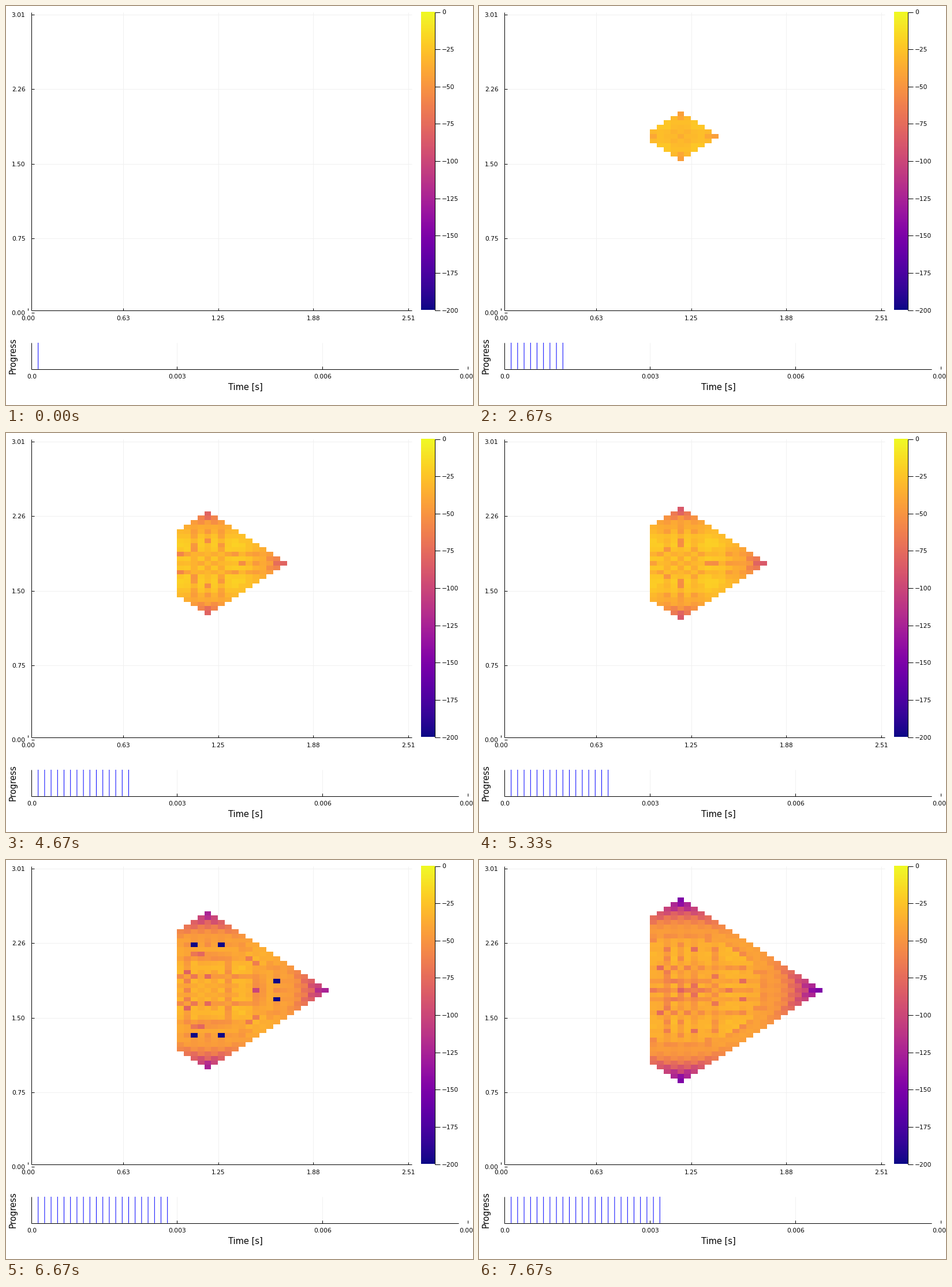
A matplotlib script that plays this animation: 809x692 px, repeating every 8000 ms.

```python
import numpy as np
import matplotlib.pyplot as plt
from matplotlib.animation import FuncAnimation

W, H, DPI = 809, 692, 64
PX = 72 / DPI                      # one pixel in points
FRAMES, LOOP_MS = 24, 8000

NX, NY = 55, 66                    # cells of the visible slice
X0, DX = 38.5, 11.975              # pixel position of cell index 0 and cell pitch
Y0, DY = 532.0, 7.842
EMIT_X, EMIT_Y, WALL_X = 26, 39, 21  # emitter cell and absorbing wall plane
SLICE_DIST = 4                     # planes between the emitter and the slice
REFLECTION = 0.4


def simulate():
    """3D leapfrog wave scheme at the stability limit; dB levels per frame."""
    depth = 2 * FRAMES + 1
    mid = depth // 2
    shape = (NX + 1 - WALL_X, NY + 1, depth)
    prev, cur = np.zeros(shape), np.zeros(shape)
    loss = (1 - REFLECTION) / (1 + REFLECTION) / np.sqrt(3)
    pulse = [1, 1, -1, -1]
    i, j = np.meshgrid(np.arange(1, NX + 1), np.arange(1, NY + 1))
    reach = abs(i - EMIT_X) + abs(j - EMIT_Y)

    levels = []
    for step in range(FRAMES + 1):
        pad = np.pad(cur, 1)
        pad[0] = pad[2]            # mirror behind the wall plane
        total = (pad[2:, 1:-1, 1:-1] + pad[:-2, 1:-1, 1:-1]
                 + pad[1:-1, 2:, 1:-1] + pad[1:-1, :-2, 1:-1]
                 + pad[1:-1, 1:-1, 2:] + pad[1:-1, 1:-1, :-2])
        new = total / 3 - prev
        new[0] = (total[0] / 3 - (1 - loss) * prev[0]) / (1 + loss)
        if step < len(pulse):
            new[EMIT_X - WALL_X, EMIT_Y, mid] += pulse[step]
        prev, cur = cur, new
        if step == 0:
            continue
        db = np.full((NY, NX), -200.0)
        plane = cur[1:, 1:, mid + SLICE_DIST].T
        db[:, WALL_X:] = 20 * np.log10(np.maximum(abs(plane), 1e-10))
        hidden = (reach > step - SLICE_DIST) | (i <= WALL_X)
        levels.append(np.ma.array(db, mask=hidden))
    return levels


plt.rcParams["font.family"] = "DejaVu Sans"
fig = plt.figure(figsize=(W / DPI, H / DPI), dpi=DPI, facecolor="white")
ax = fig.add_axes([0, 0, 1, 1])
ax.axis("off")


def line(x1, y1, x2, y2, color="black", z=5, **kw):
    return ax.plot([x1, x2], [y1, y2], color=color, lw=PX, zorder=z,
                   solid_capstyle="butt", **kw)[0]


def label(x, y, text, size=10.67, **kw):
    ax.text(x, y, text, fontsize=size * PX, zorder=6, **kw)


GRID = "#f0f0f0"

# Main axes
for k, name in enumerate(["0.00", "0.63", "1.25", "1.88", "2.51"]):
    x = X0 + k * NX / 4 * DX
    if k:
        line(x, 10.5, x, 527.5, GRID, 1)
    line(x, 523.5, x, 528)
    label(x, 545, name, ha="center")
for k, name in enumerate(["0.00", "0.75", "1.50", "2.26", "3.01"]):
    y = Y0 - k * NY / 4 * DY + 0.4
    if k:
        line(44.5, y, 703.5, y, GRID, 1)
    line(44.5, y, 49, y)
    label(33.5, y + 4, name, ha="right")
line(44.5, 10.5, 44.5, 528)
line(44, 527.5, 703.5, 527.5)

# Colour bar
ax.imshow(np.linspace(0, 1, 256)[:, None], cmap="plasma", aspect="auto",
          origin="lower", extent=[719.5, 743.5, 527.5, 10.5], zorder=2)
line(743.5, 10.5, 743.5, 528)
for k in range(9):
    y = 10.5 + k * 517 / 8
    line(743.5, y, 752, y)
    label(755, y + 4, f"{-25 * k}".replace("-", "\u2212"))

# Progress strip
for k, name in enumerate(["0.0", "0.003", "0.006", "0.009"]):
    x = 44.5 + 252 * k
    if k in (1, 2):
        line(x, 584, x, 629, GRID, 1)
    line(x, 625, x, 630)
    label(x, 646, name, ha="center", clip_on=True)
line(44.5, 584, 44.5, 630)
line(44, 629.5, 784.5, 629.5)
label(414.5, 666, "Time [s]", 14.67, ha="center")
label(12.5, 607, "Progress", 14.67, ha="center", va="center", rotation=90)

marks = [line(x, 584, x, 629.8, "blue", 7, snap=False)
         for x in 44.5 + 11.2 * np.arange(1, FRAMES + 1)]

levels = simulate()
field = ax.imshow(levels[0], cmap="plasma", vmin=-200, vmax=0, aspect="auto",
                  origin="lower", interpolation="nearest", zorder=3,
                  extent=[X0 + DX / 2, X0 + (NX + 0.5) * DX,
                          Y0 - DY / 2, Y0 - (NY + 0.5) * DY])
ax.set_xlim(0, W)
ax.set_ylim(H, 0)


def draw(frame):
    field.set_data(levels[frame])
    for k, mark in enumerate(marks):
        mark.set_visible(k <= frame)
    return [field, *marks]


anim = FuncAnimation(fig, draw, frames=FRAMES, interval=LOOP_MS / FRAMES,
                     repeat=True, repeat_delay=0)
plt.show()
```
